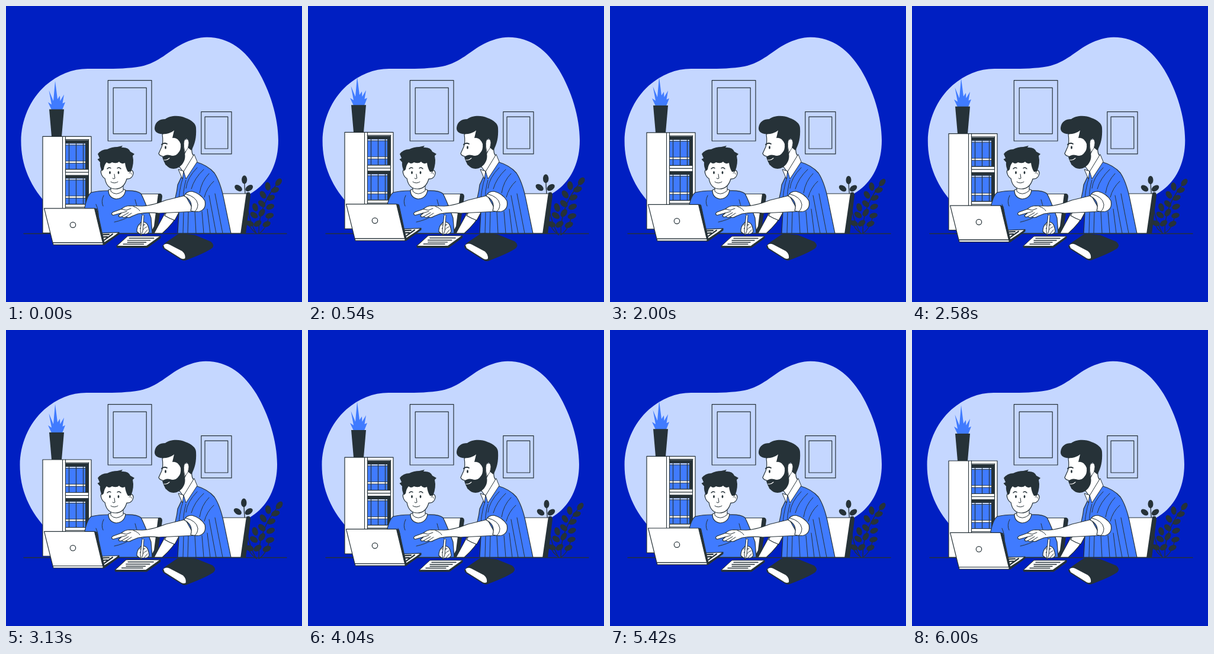
An HTML page with a canvas that plays this animation: 500 px wide and 500 px high, repeating every 6040 ms.

```html
<!DOCTYPE html>
<html lang="en">
<head>
<meta charset="utf-8">
<title>Study desk</title>
<style>
html, body { margin: 0; width: 100%; height: 100%; overflow: hidden; background: #001fc2; }
canvas { display: block; width: 100vw; height: 100vh; }
</style>
</head>
<body>
<canvas id="stage"></canvas>
<script>
const SIZE = 500, LOOP = 6040, LEAD = 40;
const BG = '#001fc2', PALE = '#c5d7ff', BLUE = '#407bff', INK = '#263238', WHITE = '#fff';

const canvas = document.getElementById('stage');
const ctx = canvas.getContext('2d');
const dpr = window.devicePixelRatio || 1;
canvas.width = canvas.height = SIZE * dpr;

// ---- drawing helpers ----
const cache = new Map();
function path(d) {
  if (!cache.has(d)) cache.set(d, new Path2D(d));
  return cache.get(d);
}
function fill(d, color) {
  ctx.fillStyle = color;
  ctx.fill(path(d));
}
function line(d, width = 1.2, color = INK) {
  ctx.strokeStyle = color;
  ctx.lineWidth = width;
  ctx.stroke(path(d));
}
function shape(d, color = WHITE, width = 1.2) {
  fill(d, color);
  line(d, width);
}
function box(x, y, w, h, color, outlined) {
  const d = `M${x} ${y}h${w}v${h}h${-w}Z`;
  if (color) fill(d, color);
  if (outlined) line(d);
}
function oval(x, y, rx, ry, turn = 0, color = INK) {
  ctx.fillStyle = color;
  ctx.beginPath();
  ctx.ellipse(x, y, rx, ry, turn * Math.PI / 180, 0, 7);
  ctx.fill();
}
function moved(dx, dy, draw) {
  ctx.save();
  ctx.translate(dx, dy);
  draw();
  ctx.restore();
}
function scaled(x, y, k, draw) {
  ctx.save();
  ctx.translate(x, y);
  ctx.scale(k, k);
  ctx.translate(-x, -y);
  draw();
  ctx.restore();
}

// ---- motion: straight steps between [share, value] keys ----
function track(keys, u) {
  let i = 1;
  while (i < keys.length - 1 && u > keys[i][0]) i++;
  const [a, p] = keys[i - 1], [b, q] = keys[i];
  return p + (q - p) * (u - a) / (b - a);
}
const SHAKE = [0, -1, 2, -4, 4, -4, 4, -4, 2, -1, 0].map((v, i) => [i / 10, v]);
const FLOAT = [[0, 0], [.5, -10], [1, 0]];
const BEAT = [[0, 1], [.1, 1.1], [.3, 1], [.4, 1], [.5, 1.1], [.6, 1], [1, 1]];

// ---- scenery ----
function blob() {
  fill('M339.5 52.7C377 52.7 405 75 425 108C446 143 460 188 460 227C460 262 447 290 427 307' +
    'C404 327 350 348 300 348H100L76 342C40 306 25.5 268 25.5 228' +
    'C25.5 194 40 158 67 134C88 116 112 106 138 106C170 106 200 107 228 102' +
    'C258 96 276 75 298 64C312 57 326 52.7 339.5 52.7Z', PALE);
}
function frames() {
  box(172.3, 125.7, 73.7, 102.3, null, true);
  box(181.2, 138.2, 56, 77.6, null, true);
  box(329.8, 178.7, 51.2, 71.2, null, true);
  box(336, 187.2, 38.8, 53.8, null, true);
}
function books(y) {
  box(100.5, y, 39, 50, INK);
  box(101, y + 6, 33, 43, BLUE);
  box(101, y + 6, 33, 2.5, PALE);
  box(101, y + 35.5, 33, 3.5, WHITE);
  line(`M101 ${y + 8.5}H134M101 ${y + 35.5}H134M101 ${y + 39}H134`, .9);
  line(`M106.5 ${y + 6}v43M118.5 ${y + 6}v43M130.5 ${y + 6}v43`, 1.2);
}
function shelf() {
  box(62, 221, 82, 163, WHITE, true);
  line('M95.5 221V384M100.5 221V384M139.5 226V384M100 226H140', 1.1);
  books(227);
  books(286);
  box(100.5, 276.5, 39, 5, WHITE, true);
  box(100.5, 335.5, 39, 5, WHITE, true);
  fill('M77 176L71 163L77 167L72.5 143L80 161L83 127L87 158L91 152L91.5 161L98 150L95.5 165L100 163L95 176Z', BLUE);
  fill('M73 175H98L94 221H77Z', INK);
}
function plant() {
  line('M423 384Q404 350 403 294M427 384Q426 337 460 298M427 384Q440 376 444 354M424 384Q411 375 411 367', 1.3);
  const leaves = [
    [403, 294, 90], [393, 308, 35], [411, 308, -35],
    [460, 298, -52], [442, 305, 82], [454, 311, -18], [434, 319, 55],
    [447, 324, -20], [432, 334, 42], [446, 339, -22], [421, 340, 72],
    [432, 349, -55], [445, 354, -15], [419, 353, 35], [412, 367, 20],
    [425, 367, -35], [440, 368, -25]
  ];
  for (const [x, y, a] of leaves) oval(x, y, 7, 4.5, a);
}
function chairs() {
  shape('M222 317.5H259L250 384H222Z');
  fill('M257 317Q264 316 264 322L257 371Q254 385 243 385L250 372Z', INK);
  shape('M360 317H408L398 384H360Z');
  fill('M406 315.5Q413 312 413 320L405 385H396Z', INK);
}

// ---- man ----
function manBody() {
  shape('M270 347L292 349Q284 366 264 384H250Z');
  shape('M273 345L293 347L285 362Q276 359 268 354Z');
  shape('M301 279L320 263Q341 269 352 282Q362 297 368 326L380 384H290L292 349L279 346Q288 322 290 302Z', BLUE);
  line('M299 290Q293 305 290 345M304 294Q298 315 300 330M323 273Q306 290 304 308M334 276Q318 291 313 309' +
    'M343 283Q330 296 327 316M351 296Q339 307 335 323', 1);
  line('M300 349L299 384M308 348L307 384M319 347L321 384M331 347L334 384M340 343L345 384M343 320L355 384M353 317L366 384', 1);
}
function manHead() {
  shape('M291 269L304 232L314 240Q313 250 318 254L300 281Z');
  shape('M318 251L323 263L304 292L300 279L298 292L291 276L300 279Z', WHITE, 1);
  shape('M264 217Q266 230 263 238L258 249Q259 253 265 254L270 268L292 272L304 244L303 210L278 205Z');
  fill('M251 206C252 195 260 191 269 191C277 185 292 184 303 189C314 193 321 199 321 206' +
    'C322 222 319 234 313 244L307 239Q310 224 304 224Q300 226 300 237L302 249C305 264 293 275 283 275' +
    'C273 275 267 266 264 255Q270 250 277 252Q286 255 291 248Q296 243 295 233Q290 221 281 223L284 210' +
    'C274 219 250 219 251 206Z', INK);
  shape('M301 227Q308 221 309 231Q309 240 303 247Q299 239 301 227Z', WHITE, .8);
  line('M267 260Q272 261 276 257', 1.1, WHITE);
  line('M263 234Q267 230 272 233', 1.8);
  oval(269.5, 239, 1.4, 2.7);
}
function manArm() {
  shape('M303 320L270 328Q248 337 230 338L208 337.5Q200 338 195 343L181 348Q176 351 181 353.5L195 349.5' +
    'L190 354Q191 358 196 355.5Q198 359 203 356Q208 359 213 355L223 351Q240 348 258 350L318 347Z');
  line('M195 343L203 345L211 342M195 349.5L204 347M196 355.5L207 349M203 356L212 350M215 338.5Q223 341 226 346', 1);
  shape('M301 321Q304 313 314 313Q329 317 336 329Q339 343 327 347Q320 348 312 346Q317 329 301 321Z');
  line('M303 317.5Q322 322 324 335Q324 343 319 347', 1);
}

// ---- boy ----
function boy() {
  shape('M133 384V340Q137 320 144 315Q156 312 173 312H200Q221 311 228 317Q234 328 245 358L247 384Z', BLUE);
  line('M165 320Q160 330 164 338M218 327Q222 345 231 354M152 335Q157 346 156 355M183 365Q200 361 207 356', 1);
  shape('M173 311Q173 324 186 326Q200 325 202 311L197 309H177Z');
  fill('M177.5 302V313Q186 322 197.5 312V298Z', WHITE);
  line('M177 306V313Q186 322 198 312V304', 1);
  shape('M163 275Q158 278 162 286Q165 291 167 291Q170 309 185 309Q199 309 204 292Q213 293 215 283Q215 276 208 277L204 262H166Z');
  fill('M162 279Q158 270 159 264L154.5 259L158 257L155 250Q161 242 171 242Q179 238 188 238L197 236L195 239' +
    'Q207 238 210 246L217 250L214 253Q217 266 211 280L206 280Q202 274 201 265Q195 268 191 263Q187 267 179 264' +
    'Q174 268 170 264Q166 268 165 276Z', INK);
  oval(175.5, 281.5, 1.4, 2.4);
  oval(190, 281.5, 1.4, 2.4);
  line('M171 275Q174 271.5 177 274M188 274Q191 271.5 194 275', 1.3);
  line('M183 284L184 291Q182 293 180 291M177 297Q183 301 189 297M208 282Q211 280 212 284', 1);
}
function boyHand() {
  shape('M221 381Q221 371 227 367Q229 362 233 365Q239 366 241 375L242 381Q239 386 233 385Q226 387 221 381Z');
  line('M226 370L233 369M226 376Q231 370 235 369M229 381Q234 374 238 373M233 385L239 378', 1);
  shape('M230 354Q232 351 233 354L231 380L228 388L227 380Z', WHITE, 1);
}

// ---- desk ----
function laptop() {
  shape('M156 384.5L191 383L166 403H160Z');
  fill('M163 401.5L191.5 383V386L166 404.5H162Z', INK);
  line('M162 387L174 386.5M162 391L171 390.5M180 386L166 396', 2.2);
  shape('M149 342.4L153.5 343.5L166 401L163 404Z', INK);
  shape('M64.5 342.4H149.5L163.5 400.5H79Z');
  shape('M79 400.5H164V404H80Z');
  ctx.strokeStyle = INK;
  ctx.lineWidth = 1.2;
  ctx.beginPath();
  ctx.arc(113, 370.3, 4.7, 0, 7);
  ctx.stroke();
}
function papers() {
  shape('M188 405.5L206 389.5H261V392L239 408H189Z', INK, 1);
  shape('M188 405.5L206 389H261L238 405.5Z', WHITE, 1);
  line('M209 392.5H250M206 396H244M206 399.3H237M199 402.3H233', 1.4);
  fill('M264 406Q266 402 272 398L289 386.5Q292 384 300 385L318 387L345 398Q352 404 347 409' +
    'Q336 417 304 429Q299 431 295 428L266 410Z', INK);
  fill('M266 404Q270 400 276 403L297 414Q303 419 302 426Q299 428 295 426L268 409Z', WHITE);
}

// ---- scene ----
function render(ms) {
  const t = (ms + LEAD) % LOOP;
  const sway = track(SHAKE, t / LOOP);
  const lift = track(FLOAT, t * 4 / LOOP % 1);
  const pulse = track(BEAT, t * 2 / LOOP % 1);

  ctx.setTransform(dpr, 0, 0, dpr, 0, 0);
  ctx.lineJoin = ctx.lineCap = 'round';
  ctx.fillStyle = BG;
  ctx.fillRect(0, 0, SIZE, SIZE);

  moved(sway, 0, blob);
  frames();
  moved(0, lift, shelf);
  scaled(427, 336, pulse, plant);
  chairs();
  manBody();
  manHead();
  boy();
  line('M30 384.5H474', 1.4);
  moved(0, lift, laptop);
  scaled(268, 407, pulse, papers);
  boyHand();
  manArm();
}

const start = performance.now();
function tick() {
  render(performance.now() - start);
  requestAnimationFrame(tick);
}
tick();
</script>
</body>
</html>
```
